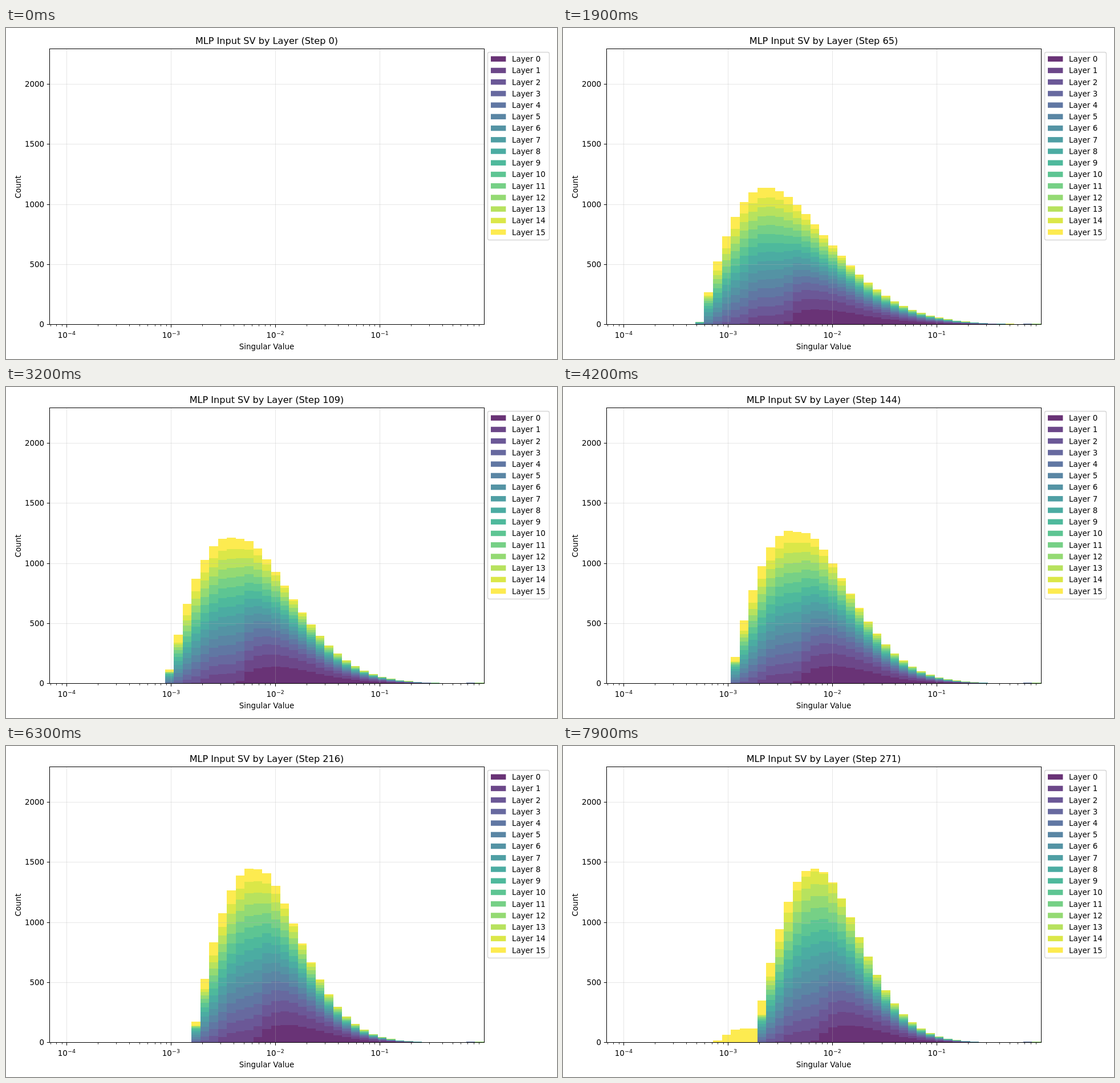
An HTML page with a canvas that plays this animation: 966 px wide and 580 px high, repeating every 8000 ms.

```html
<!DOCTYPE html>
<html lang="en">
<head>
<meta charset="utf-8">
<title>MLP Input SV by Layer</title>
<style>
  html, body { margin: 0; width: 100%; height: 100%; overflow: hidden; background: #fff; }
  canvas, svg { position: absolute; left: 0; top: 0; width: 966px; height: 580px; }
  text { font: 13.42px "DejaVu Sans", sans-serif; fill: #000; }
  .title { font-size: 16.1px; }
  .sup { font-size: 9.4px; }
  .mid { text-anchor: middle; }
  .end { text-anchor: end; }
  .grid { stroke: #b0b0b0; stroke-opacity: .3; stroke-width: 1.07; }
  .axis { stroke: #000; fill: none; }
  .minor { stroke: #000; stroke-width: .8; }
  .box { fill: #fff; fill-opacity: .8; stroke: #ccc; stroke-opacity: .8; stroke-width: 1.34; }
</style>
</head>
<body>
<canvas id="bars" width="966" height="580"></canvas>
<svg id="chart" viewBox="0 0 966 580"></svg>
<script>
const LEFT = 76.5, RIGHT = 838, TOP = 36.5, BASE = 519.5;
const BINS = 49, UNIT = 0.2104, DECADE = 182.9;
const FRAMES = 80, FRAME_MS = 100, STEPS_PER_FRAME = 3.433;
const VALUES_PER_LAYER = 1024;
const COLORS = ('440154 481a6c 472f7d 414487 39568c 31688e 2a788e 23888e ' +
  '1f988b 22a884 35b779 54c568 7ad151 a5db36 d2e21b fde725').split(' ').map(c => '#' + c);
const LAST = COLORS.length - 1;

// Frame, then in bins: foot of the rise, start of the fall, length of the fall.
const KEYS = [
  [1, -.1, 8.4, 11.1], [10, 4.5, 13, 11.1], [19, 9.9, 18, 10.3], [32, 12.6, 21.5, 8.3],
  [52, 14, 22.4, 7.4], [63, 15.55, 23.4, 6.8], [79, 16.3, 23.5, 6.8]
];

const sigmoid = x => 1 / (1 + Math.exp(-x));
const bump = (x, centre, width) => Math.exp(-(((x - centre) / width) ** 2) / 2);
const snap = v => Math.floor(v) + .5;
const binX = i => Math.round(LEFT + i * (RIGHT - LEFT) / BINS);
const countY = c => Math.round(BASE - c * UNIT);

function keyed(frame) {
  const n = Math.max(1, KEYS.findIndex(k => k[0] >= frame));
  const a = KEYS[n - 1], b = KEYS[n], p = (frame - a[0]) / (b[0] - a[0]);
  return a.map((v, j) => v + (b[j] - v) * p);
}

function stateAt(frame) {
  const [, foot, top, fall] = keyed(frame);
  const early = Math.exp(-frame / 18);
  const rise = 6.7 + 2.4 * early;
  // The area under the outline stays constant, which sets its height.
  const area = rise * 2 / Math.PI + (top - foot - rise) + .89 * fall;
  // The last layer slips to smaller values twice.
  const slip = 4.3 * (bump(frame, 50, 2) + sigmoid(frame - 67));
  return {
    foot, top, fall, rise,
    peak: LAST * VALUES_PER_LAYER / area,
    spread: 6.6 + 9.4 * early,
    ratio: .38 + .38 * early,
    lastFrom: foot + .9 + 1.9 * early - slip,
    lastWidth: 10 - .018 * frame,
    lastSoft: 1.2 + 4.5 * early
  };
}

// Summed count of all layers but the last.
function outline({ foot, top, fall, rise, peak }, x) {
  if (x <= foot) return 0;
  if (x < foot + rise) return peak * Math.sin(Math.PI / 2 * (x - foot) / rise);
  return peak * Math.exp(-((Math.max(0, x - top) / fall) ** 1.75));
}

function lastLayer({ lastFrom, lastWidth, lastSoft }, x) {
  if (x < lastFrom - 1.35) return 0;
  return VALUES_PER_LAYER / lastWidth * sigmoid((x - lastFrom) / .5) *
    sigmoid((lastFrom + lastWidth - x) / lastSoft);
}

function layerCounts(s, i) {
  // The two rightmost bins hold one top value per layer.
  if (i >= BINS - 2) return COLORS.map((_, k) => +((k < 8) === (i === BINS - 2)));
  const start = s.foot + .6;
  const extra = Math.min(4, .5 * Math.max(0, i - start - s.spread + .6 * (s.spread - 7)));
  const weights = COLORS.slice(0, LAST).map((_, k) => {
    const edge = start + s.spread * s.ratio ** k + .12 * Math.max(0, k - 7);
    return sigmoid((i - edge) / .35) * (1 + extra * .6 ** k);
  });
  const scale = outline(s, i) / weights.reduce((a, b) => a + b);
  return [...weights.map(w => w * scale), lastLayer(s, i)];
}

const ctx = document.getElementById('bars').getContext('2d');
function drawBars(frame) {
  ctx.clearRect(0, 0, 966, 580);
  if (frame === 0) return;
  ctx.globalAlpha = .8;
  const state = stateAt(frame);
  for (let i = 0; i < BINS; i++) {
    const x = binX(i), w = binX(i + 1) - x;
    let sum = 0, y = countY(0);
    layerCounts(state, i).forEach((c, k) => {
      sum += c;
      const top = countY(sum);
      ctx.fillStyle = COLORS[k];
      ctx.fillRect(x, top, w, y - top);
      y = top;
    });
  }
}

const svg = document.getElementById('chart');
function add(tag, attrs, text = '') {
  const el = document.createElementNS('http://www.w3.org/2000/svg', tag);
  for (const k in attrs) el.setAttribute(k, attrs[k]);
  el.textContent = text;
  return svg.appendChild(el);
}
const line = (cls, x1, y1, x2, y2) => add('line', { class: cls, x1, y1, x2, y2 });
const label = (cls, x, y, text) => add('text', { class: cls, x, y }, text);

const decadeX = e => 106.5 + (e + 4) * DECADE;
for (let e = -5; e < 0; e++) {
  for (let m = 2; m < 10; m++) {
    const x = decadeX(e + Math.log10(m));
    if (x > LEFT && x < RIGHT) line('minor', snap(x), 520, snap(x), 522.7);
  }
  if (e < -4) continue;
  const x = decadeX(e);
  line('grid', snap(x), TOP, snap(x), BASE);
  line('axis', snap(x), 520, snap(x), 524.7);
  label('', x - 15.7, 543, '10');
  label('sup', x + 1.7, 537.7, '\u2212' + -e);
}
for (let c = 0; c <= 2000; c += 500) {
  const y = snap(BASE - c * UNIT);
  if (c) line('grid', LEFT, y, RIGHT, y);
  line('axis', 71.8, y, LEFT, y);
  label('end', 67, y + 4.9, c);
}
add('rect', { class: 'axis', x: LEFT, y: TOP, width: snap(RIGHT) - LEFT, height: BASE - TOP });
label('mid', 457, 563, 'Singular Value');
add('text', { class: 'mid', transform: 'translate(25.5 278.5) rotate(-90)' }, 'Count');
const title = label('title mid', 457, 28, '');

add('rect', { class: 'box', x: 844.5, y: 42.5, width: 108, height: 329, rx: 2.7 });
COLORS.forEach((fill, k) => {
  const y = 54.2 + k * 20.23;
  add('rect', { x: 850, y: y - 4.7, width: 26.4, height: 9.4, fill, 'fill-opacity': .8 });
  label('', 887, y + 4.9, 'Layer ' + k);
});

let shown = -1;
function tick() {
  const frame = Math.floor(performance.now() / FRAME_MS) % FRAMES;
  if (frame !== shown) {
    shown = frame;
    drawBars(frame);
    title.textContent = `MLP Input SV by Layer (Step ${Math.floor(frame * STEPS_PER_FRAME)})`;
  }
  requestAnimationFrame(tick);
}
tick();
</script>
</body>
</html>
```
